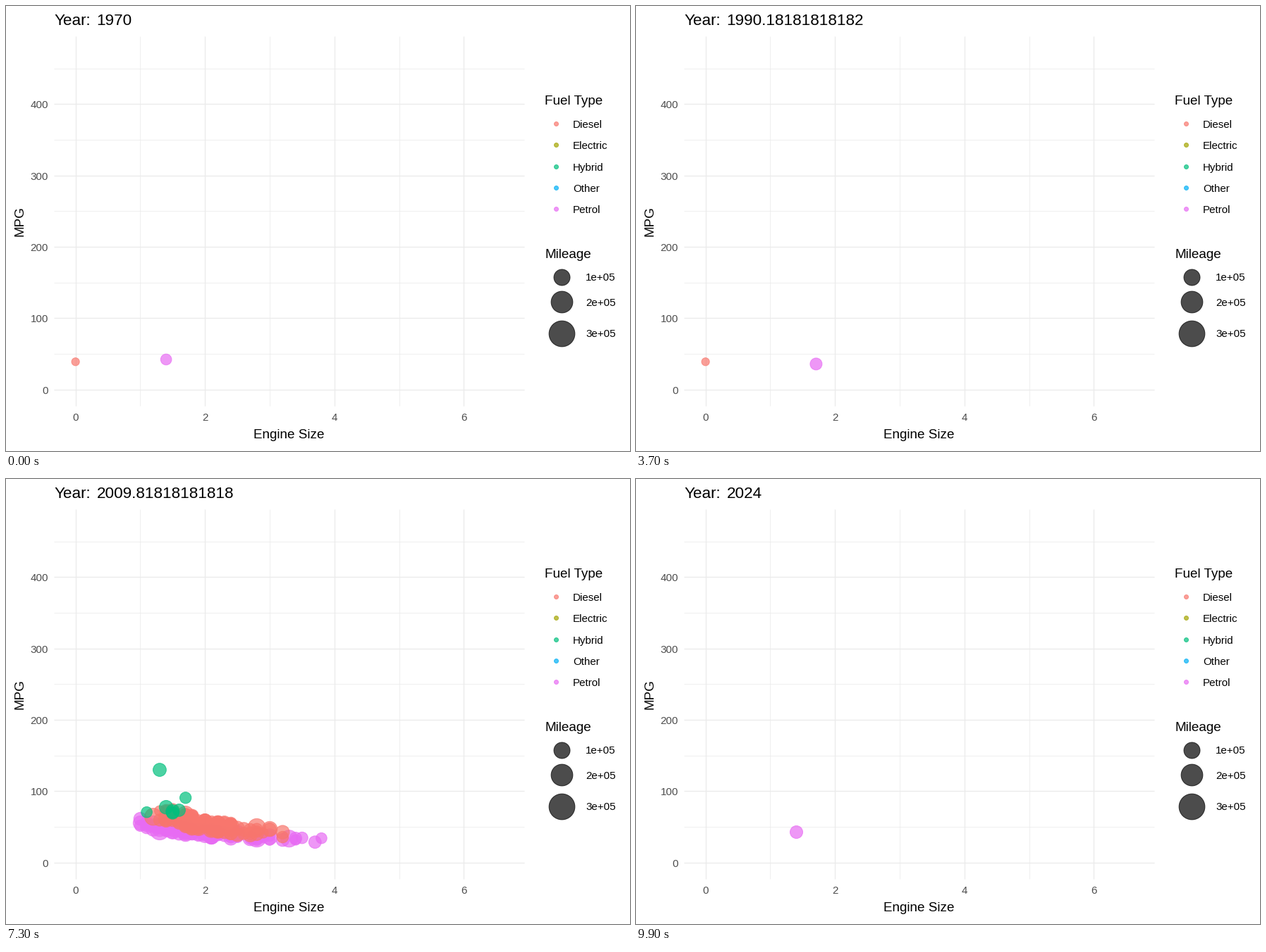
These frames come from a looping animation (885x632 px, 10000 ms). A matplotlib script:

```python
import numpy as np
import matplotlib.pyplot as plt
from matplotlib.animation import FuncAnimation
from matplotlib.colors import to_rgba

W, H, DPI = 885, 632, 100
PX = 72 / DPI  # points per pixel
FRAMES, FIRST, LAST = 100, 1970, 2024

COLORS = {"Diesel": "#F8766D", "Electric": "#A3A500", "Hybrid": "#00BF7D",
          "Other": "#00B0F6", "Petrol": "#E76BF3"}
LAYERS = ["Petrol", "Diesel", "Other", "Electric", "Hybrid"]
ALPHA = 0.7

rng = np.random.default_rng(7)


def sx(engine):
    return 98.6 + 91.8 * engine


def sy(mpg):
    return 544.8 - 1.0138 * mpg


def radius(miles):
    return 2.6 + 0.0297 * np.sqrt(miles)


# ---- data: rows of (engine, mpg, radius) per year and fuel ----

def progress(year):
    return np.clip((year - 2000.5) / 13, 0, 1)


def sizes(fuel, year, u):
    """Engine size for each rank u between 0 and 1."""
    g = np.sqrt(progress(year))
    if fuel == "Petrol":
        return 1.6 - 0.6 * g + 1.35 * u + 1.6 * g * u ** 9
    if fuel == "Diesel":
        return 1.4 + 1.15 * u + 0.5 * u ** 10
    return 1.35 + 0.4 * u


def economy(fuel, year, engine, v):
    """Miles per gallon; v between 0 and 1 places a car within its band."""
    t = progress(year)
    if fuel == "Petrol":
        mid, spread = (48 + 12 * t) * engine ** -0.45, 0.06 + 0.08 * t
    elif fuel == "Diesel":
        mid, spread = (57 + 31 * t) * engine ** -0.58, 0.07 + 0.12 * t
    else:
        mid, spread = 62 + 14 * t, 0.05
    newer = 1 - 0.04 * max(0, year - 2016)
    return mid * newer * (1 + spread * (2 * v - 1))


def cars(fuel, year, n):
    # The same row keeps its rank from year to year.
    k = np.arange(1, n + 1)
    u, v = k * 0.7549 % 1, k * 0.5698 % 1
    base = 1.6 if fuel == "Petrol" and year <= 2000 else 1.0
    engine = np.maximum(sizes(fuel, year, u) + rng.normal(0, 0.12, n), base)
    mpg = economy(fuel, year, engine, v)
    if fuel == "Hybrid":
        plug_in = progress(year) ** 6 * v ** 8
        engine = engine - 0.8 * plug_in
        mpg = mpg + 390 * plug_in
    miles = min(75e3, 5500 * (2020.4 - year)) * rng.lognormal(0, 0.35, n)
    return np.c_[np.round(engine, 1), mpg, radius(miles)]


def one_year(year):
    total = 3 + 1100 / (1 + np.exp((2013.5 - year) / 2.6))
    diesel = np.clip((year - 2000) / 15, 0, 0.5)
    hybrid = 0.03 * (year > 2003)
    share = {"Petrol": 1 - diesel - hybrid, "Diesel": diesel, "Hybrid": hybrid}
    if year > 2014:
        share.update(Other=0.008, Electric=0.001)
    rows = {f: cars(f, year, int(np.ceil(total * s))) for f, s in share.items()}
    if year in range(2004, 2020, 4):  # a missing size and a very large engine
        rows["Diesel"][-1, 0] = 0
        rows["Petrol"][-1, :2] = 5.4 + (year - 2004) / 10, 15
    return rows


YEARS = {1970: {"Petrol": np.array([[1.4, 42.2, 8.3]]),
                "Diesel": np.array([[0, 39, 6.1]])},
         1996: {"Petrol": np.array([[1.8, 34, 9.2]])},
         **{year: one_year(year) for year in range(1997, 2021)},
         LAST: {"Petrol": np.array([[1.4, 43.3, 9.5]])}}

# Each year sits on the nearest whole frame.
KEYS = {round(1 + (y - FIRST) / (LAST - FIRST) * (FRAMES - 1)) - 1: rows
        for y, rows in YEARS.items()}
STEPS = sorted(KEYS)


def rows_at(i):
    if i in KEYS:
        return KEYS[i]
    k = np.searchsorted(STEPS, i)
    lo, hi = STEPS[k - 1], STEPS[k]
    t = (i - lo) / (hi - lo)
    out = {}
    for fuel, a in KEYS[lo].items():
        b = KEYS[hi].get(fuel, a[:0])
        n = min(len(a), len(b))
        # Unmatched points wait in place until the next year.
        out[fuel] = np.vstack([a[:n] * (1 - t) + b[:n] * t, a[n:]])
    return out


# ---- drawing ----

plt.rcParams["font.family"] = "Liberation Sans"
fig = plt.figure(figsize=(W / DPI, H / DPI), dpi=DPI, facecolor="white")
ax = fig.add_axes([0, 0, 1, 1])
ax.set(xlim=(0, W), ylim=(H, 0))
ax.axis("off")


def label(x, y, text, px=15.1, color="black", **kw):
    return ax.text(x, y, text, fontsize=px * PX, color=color, **kw)


def areas(r):
    return ((2 * np.asarray(r) - 1) * PX) ** 2


def dots(x, y, r, color):
    rgba = [to_rgba(color, ALPHA)]
    return ax.scatter(x, y, s=areas(r), facecolors=rgba, edgecolors=rgba,
                      linewidths=PX, zorder=3)


def grid(engines, mpgs, width):
    style = dict(colors="#EBEBEB", linewidths=width * PX, zorder=1)
    ax.hlines([sy(m) for m in mpgs], 68, 735, **style)
    ax.vlines([sx(e) for e in engines], 43, 568, **style)


grid([1, 3, 5], range(50, 451, 100), 0.8)
grid([0, 2, 4, 6], range(0, 401, 100), 1.4)
for e in (0, 2, 4, 6):
    label(sx(e), 589, str(e), color="#4D4D4D", ha="center")
for m in range(0, 401, 100):
    label(60, sy(m) + 6, str(m), color="#4D4D4D", ha="right")
label(401.5, 614, "Engine Size", 18.9, ha="center")
label(24.5, 305.5, "MPG", 18.9, rotation=90, rotation_mode="anchor",
      ha="center", va="baseline")

label(764.5, 140.5, "Fuel Type", 18.9)
for k, (fuel, color) in enumerate(COLORS.items()):
    y = 167 + 30.3 * k
    dots([780], [y], [3.5], color)
    label(804, y + 6, fuel)
label(764.5, 358.5, "Mileage", 18.9)
for y, n in ((384.5, 1), (419.5, 2), (464.5, 3)):
    dots([788.4], [y], [radius(n * 1e5)], "black")
    label(822, y + 6, f"{n}e+05")

label(68.5, 27, "Year:", 22.5)
counter = label(128.5, 27, "", 22.5)
cloud = dots([], [], [], "black")


def update(i):
    year = FIRST + (LAST - FIRST) * i / (FRAMES - 1)
    counter.set_text(f"{year:.15g}")
    rows = rows_at(i)
    fuels = [f for f in LAYERS if f in rows]
    points = np.vstack([rows[f] for f in fuels])
    tints = [to_rgba(COLORS[f], ALPHA) for f in fuels for _ in rows[f]]
    cloud.set_offsets(np.c_[sx(points[:, 0]), sy(points[:, 1])])
    cloud.set_sizes(areas(points[:, 2]))
    cloud.set_facecolor(tints)
    cloud.set_edgecolor(tints)
    return counter, cloud


anim = FuncAnimation(fig, update, frames=FRAMES, interval=100,
                     init_func=lambda: update(0), repeat=True, repeat_delay=0)
plt.show()
```
